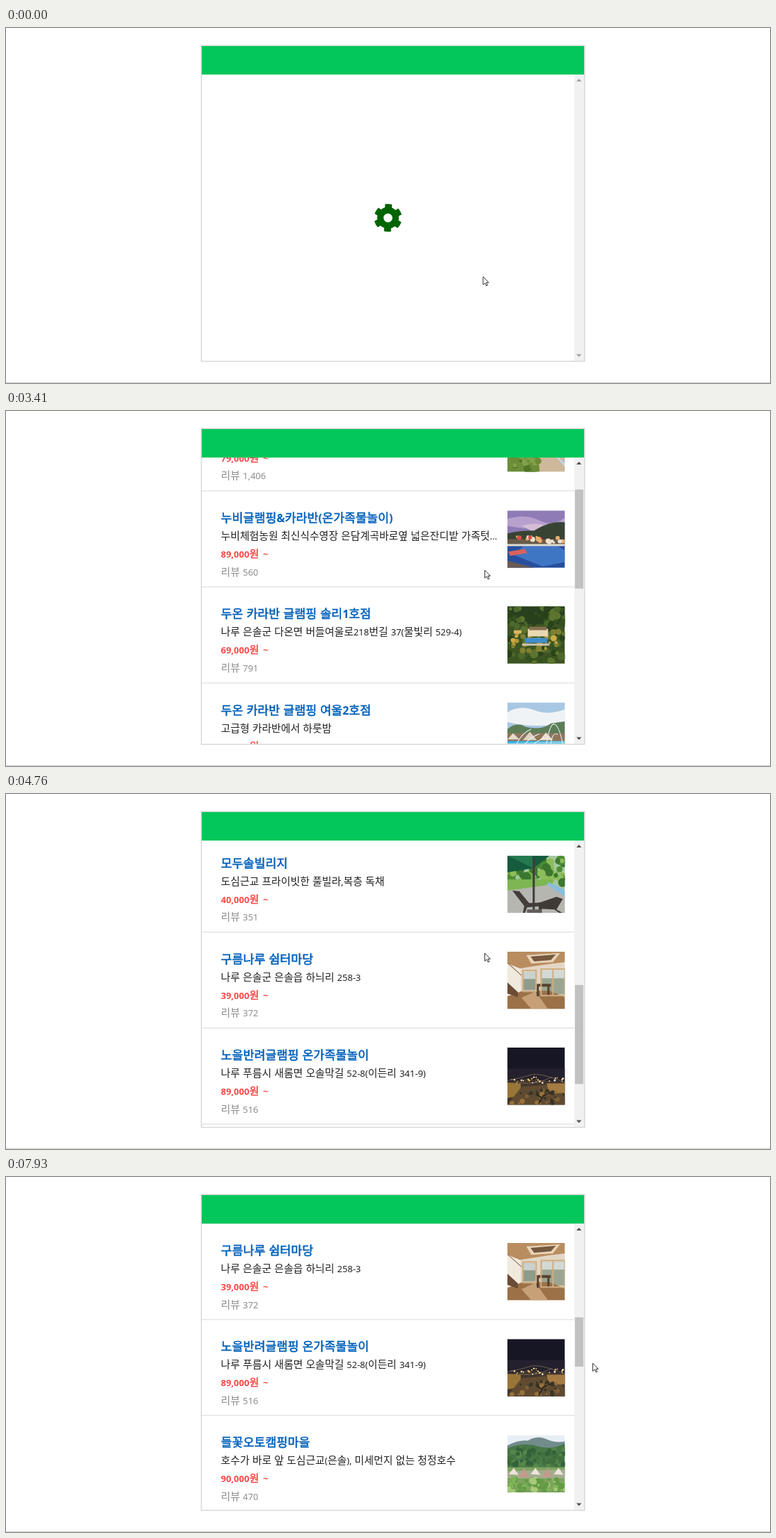
These frames come from a looping animation (1097 by 511 pixels, 8000 ms). An HTML page:

```html
<!DOCTYPE html>
<html lang="ko">
<head>
<meta charset="utf-8">
<style>
  html, body { margin: 0; width: 100%; height: 100%; overflow: hidden; background: #fff; }
  svg { display: block; }
  text { font: 13px "Noto Sans", "Open Sans", sans-serif; fill: #222; word-spacing: .7px; }
  .ko { font-family: "Noto Sans CJK KR", "Noto Sans CJK", sans-serif; font-size: 14.9px; }
  .title { font-size: 16px; font-weight: 700; fill: #0060bb; }
  .title .ko { font-size: 17.4px; font-weight: 400; stroke: #0060bb; stroke-width: .55px; }
  .price { font-weight: 700; fill: #fb4747; word-spacing: 2.5px; }
  .price .ko { font-weight: 400; stroke: #fb4747; stroke-width: .5px; }
  .review { fill: #8c8c8c; }
</style>
</head>
<body>
<svg id="stage" width="1097" height="511" viewBox="0 0 1097 511">
  <clipPath id="view"><path d="M281 67H816V479H281Z"/></clipPath>
  <path fill="#ccc" d="M0 510H1097V511H0Z"/>
  <path fill="#fff" stroke="#d9d9d9" stroke-width="1.6" d="M280.5 25.2H830.8V479.8H280.5Z"/>
  <path fill="#03c75a" d="M281 26H830V67H281Z"/>
  <g clip-path="url(#view)"><g id="list"></g></g>
  <g id="gear" fill="#006400">
    <circle r="15.5"/>
    <path id="tooth" d="M-5 -19.5Q0 -20.5 5 -19.5V19.5Q0 20.5 -5 19.5Z"/>
    <use href="#tooth" transform="rotate(60)"/>
    <use href="#tooth" transform="rotate(120)"/>
    <circle r="6.4" fill="#fff"/>
  </g>
  <path fill="#f1f1f1" d="M816 67H830V479H816Z"/>
  <path id="up" d="M819 77H826.4L822.7 73Z"/>
  <path id="down" d="M819 469.5H826.4L822.7 473.5Z"/>
  <rect id="thumb" x="817" width="12"/>
  <path id="cursor" fill="#fff" stroke="#333" d="M0 0V11.5L2.7 9.1L4.7 13.1L6.4 12.3L4.5 8.4H8Z"/>
</svg>
<script>
const $ = id => document.getElementById(id);
const LOOP = 8000, ROW = 138.2, LIST_AT = 280, MORE_AT = 5580;

let seed = 7;
const rnd = () => (seed = seed * 16807 % 2147483647) / 2147483647;

const shapes = spec => spec.split(';').map(s => {
  const [, fill, d] = s.trim().match(/^(\S+) (.*)$/);
  return `<path fill="${fill}" d="${d}"/>`;
}).join('');

// Scattered spots for foliage, lights and crowds
const spots = (n, x, y, w, h, r, ...colors) => Array.from({ length: n }, () =>
  `<circle cx="${x + rnd() * w}" cy="${y + rnd() * h}" r="${r * (.5 + rnd())}" ` +
  `fill="${colors[rnd() * colors.length | 0]}"/>`).join('');

const line = (d, color, width) => `<path d="${d}" fill="none" stroke="${color}" stroke-width="${width}"/>`;

const photos = [
  // cabins along a path
  shapes('#c3d6e4 M0 0H82V82H0Z; #e2e5e3 M0 22L82 10V45H0Z') +
  spots(22, 24, 22, 34, 18, 4, '#8f9c67', '#6f8549', '#a5ad83') +
  spots(14, 38, 0, 22, 10, 3, '#96a568', '#b6bb86') +
  shapes('#9b5940 M0 12L21 9L29 30L0 33Z; #ddd5c6 M0 33H27V54H0Z; #76594a M6 36H20V55H6Z; #6d8d39 M0 54L43 42L48 82H0Z; #cdb89a M42 43H53L82 75V82H46Z; #754d3c M58 29L70 16L82 34V52L59 42Z; #c9b7a0 M59 38L82 50V70L59 48Z') +
  spots(22, 2, 56, 42, 25, 4, '#517429', '#83a04a', '#6c8a37') +
  line('M64 14L80 60M49 34L82 12M25 4V50', '#4a3d36', 2),
  // pool at dusk
  shapes('#8f7bb5 M0 0H82V42H0Z; #b7a0cd M0 12Q25 4 45 14T82 10V24Q40 30 0 22Z; #d5bdd5 M20 22Q45 15 60 25L40 32Z; #384433 M0 33Q20 28 38 29Q62 14 82 17V46H0Z; #685a49 M0 41H82V52H0Z; #284f9d M0 49H82V82H0Z; #3f76c4 M22 51H72L82 57V74L50 80L10 64Z; #dedbd2 M0 48H82V51H0Z; #da625b M1 59L25 55L28 61L4 65Z; #6a5a54 M0 72L38 82H0Z') +
  spots(20, 0, 37, 82, 9, 2.5, '#dc4c44', '#e7b06c', '#f0dfcf'),
  // lodge in a forest
  shapes('#3d5423 M0 0H82V82H0Z; #28401e M0 0H82V25H0Z') +
  spots(90, 0, 0, 82, 82, 4, '#33501e', '#4c682a', '#5c742f', '#2a421b') +
  spots(32, 4, 36, 74, 28, 3, '#b69738', '#cfaa45', '#7f8131') +
  shapes('#e9d9b2 M29 32H58V43H29Z; #85714f M31 29H56V34H31Z; #3f8ecb M25 45H57V52H25Z; #cdc6ad M21 53H60V56H21Z; #d8b763 M9 34H20V39H9Z'),
  // pool with fountains
  shapes('#a8c7e3 M0 0H82V44H0Z; #f0f3f5 M0 14Q18 3 38 11T82 10V29Q40 38 0 28Z; #5d7d57 M0 38Q14 27 26 35Q49 40 62 30L82 27V52H0Z; #8e765c M0 44H82V57H0Z; #e5ddcf M0 53L8 44L17 53Z; #dfd3c2 M22 54L32 42L42 54Z; #e9e0d3 M46 54L55 43L65 54Z; #35aede M0 55H82V82H0Z; #7acbe8 M0 58L82 55V62L0 68Z') +
  line('M8 82Q11 48 34 38M17 82Q21 53 46 45M27 82Q31 57 52 52M55 65Q60 29 67 31T80 64M61 67Q63 40 72 46', '#e5f4fa', 1),
  // loungers beneath a parasol
  shapes('#a5c8a0 M0 0H82V82H0Z') +
  spots(70, 0, 6, 82, 36, 5, '#4e8e32', '#73ad46', '#3c7730', '#8cbd59') +
  shapes('#7db652 M0 34H64V51H0Z; #86bede M59 38L82 49V61L55 43Z; #b6b6b1 M0 50L58 42L82 59V82H0Z; #155b3e M0 0H60L37 18L0 24Z; #247a50 M0 0H35L37 18Z; #3e3d3b M36 4H39V78H36Z; #423d39 M7 50L17 51L31 68L49 67V72L28 74L25 82H22L24 72Z; #403a37 M44 68L70 59L79 62L70 77L79 82H74L67 77L49 76V82H45Z; #615e5a M28 77H48V82H28Z'),
  // bright wooden room
  shapes('#e3d6c5 M0 0H82V82H0Z; #b98d60 M0 0H82V15L57 18L18 24L0 17Z; #e8d3b5 M27 5L75 2L65 15L34 17Z; #76583f M33 7L69 4L62 12L38 14Z; #f0e9dd M0 17L19 25V63H0Z; #8f9c8b M23 29H40V55H23Z; #c9d2cd M23 29H40V39H23Z; #9ba692 M49 27H82V61H49Z; #d3dad6 M49 27H82V38H49Z; #9c7148 M0 64L22 56H60L82 65V82H0Z; #c7a077 M20 66L40 57L58 82H34Z; #57412f M40 46H62V50H60V64H57V50H45V64H42Z; #6b4c35 M0 44L15 58V65L0 60Z') +
  line('M22 27H41V57H22ZM48 25H82V63H48ZM65 25V63', '#cfae82', 2) +
  line('M0 16L20 34', '#8b6a4a', 1),
  // night garden
  shapes('#171624 M0 0H82V82H0Z; #24202d M0 30H82V50H0Z; #42362d M0 49L25 45L82 49V82H0Z; #997638 M0 50L19 51V69L0 72Z; #604b31 M20 56L70 52L82 73V82H0Z; #a57c43 M56 51H82V65H59Z') +
  line('M0 47Q21 43 33 39T82 50M17 50Q39 54 64 42', '#8e7860', .7) +
  spots(28, 2, 42, 78, 9, 1, '#ffe3a0', '#e9b96b', '#fff0ce') +
  spots(28, 6, 61, 72, 19, 2.5, '#7d6038', '#393526', '#97723a') +
  line('M45 80L51 69L62 64M49 72L42 67', '#31291f', 2),
  // camp below wooded hills
  shapes('#e8eff4 M0 0H82V82H0Z; #718c8b M0 15Q15 7 29 8Q43 0 56 6T82 9V28H0Z; #477746 M0 19Q22 10 43 16T82 12V55H0Z') +
  spots(85, 0, 18, 82, 28, 3, '#416f3d', '#56874b', '#34623a') +
  shapes('#7da35f M0 46H82V82H0Z; #a3ad8e M0 52L82 49V62H0Z') +
  shapes([2, 17, 33, 50, 66].map((x, i) =>
    `${i % 2 ? '#c39a8c' : '#eee4dc'} M${x} ${56 + i % 2 * 4}L${x + 7} 47L${x + 14} ${57 + i % 2 * 4}Z`).join(';')) +
  spots(60, 0, 62, 82, 20, 3, '#7fb457', '#a5cb79', '#659b46')
];

const rows = [
  ['나루 은솔산 포근한 카라반&수영장 글램핑', '나루 은솔산자락에 위치한 최고급글램핑과 럭셔리카라반', '79,000', '1,406'],
  ['누비글램핑&카라반(온가족물놀이)', '누비체험농원 최신식수영장 은담계곡바로옆 넓은잔디밭 가족텃...', '89,000', '560'],
  ['두온 카라반 글램핑 솔리1호점', '나루 은솔군 다온면 버들여울로218번길 37(물빛리 529-4)', '69,000', '791'],
  ['두온 카라반 글램핑 여울2호점', '고급형 카라반에서 하룻밤', '64,000', '614'],
  ['모두솔빌리지', '도심근교 프라이빗한 풀빌라,복층 독채', '40,000', '351'],
  ['구름나루 쉼터마당', '나루 은솔군 은솔읍 하늬리 258-3', '39,000', '372'],
  ['노을반려글램핑 온가족물놀이', '나루 푸름시 새롬면 오솔막길 52-8(이든리 341-9)', '89,000', '516'],
  ['들꽃오토캠핑마을', '호수가 바로 앞 도심근교(은솔), 미세먼지 없는 청정호수', '90,000', '470']
];

const label = (kind, y, str) => `<text class="${kind}" x="308.5" y="${y}">` +
  str.replace(/&/g, '&amp;').replace(/[가-힣]+/g, '<tspan class="ko">$&</tspan>') + '</text>';

$('list').innerHTML = rows.map(([title, info, price, reviews], i) =>
  `<g transform="translate(0 ${67 + i * ROW})">` +
  label('title', 45, title) + label('info', 70, info) +
  label('price', 96, price + '원 ~') + label('review', 121.5, '리뷰 ' + reviews) +
  `<svg x="720" y="28" width="82.5" height="82.5" viewBox="0 0 82 82">${photos[i]}</svg>` +
  '<path fill="#e5e5e5" d="M281 137.4H816V138.9H281Z"/></g>').join('');

// Keys are [time, ...values]
const scrollKeys = [[3090, 0], [3450, 101], [3860, 202.4], [3940, 220], [4760, 558.8],
  [4920, 607], [5250, 607], [5500, 691]];
const cursorKeys = [[0, 685, 358], [250, 690, 352], [860, 818, 190], [940, 821, 179],
  [1080, 845, 110], [1230, 815, 76], [1400, 762, 130], [1550, 790, 212], [1710, 850, 195],
  [1800, 855, 150], [1950, 815, 86], [2120, 765, 140], [2300, 795, 214], [2550, 722, 204],
  [2780, 687.5, 229], [5850, 687.5, 229], [6250, 745, 245], [6500, 790, 284], [6700, 817, 215],
  [6860, 846, 250], [7050, 815, 314], [7250, 770, 260], [7420, 805, 188], [7540, 846, 215],
  [7700, 849, 245], [7800, 820, 255], [7930, 842.5, 268]];

function at(keys, t) {
  const i = keys.findIndex(k => k[0] > t);
  if (i < 0) return keys[keys.length - 1].slice(1);
  if (i === 0) return keys[0].slice(1);
  const a = keys[i - 1], b = keys[i], f = (t - a[0]) / (b[0] - a[0]);
  return a.slice(1).map((v, n) => v + (b[n + 1] - v) * f);
}

const set = (id, attrs) => Object.entries(attrs).forEach(([k, v]) => $(id).setAttribute(k, v));

function draw(t) {
  const loaded = t >= LIST_AT, more = t >= MORE_AT;
  const [scroll] = at(scrollKeys, t), [x, y] = at(cursorKeys, t);
  const top = 82 + scroll * (more ? .1737 : .345), height = more ? 71 : 142.5;
  const hover = x >= 816 && x < 830 && y >= top && y < top + height;
  const arrow = on => ({ fill: on ? '#505050' : '#a3a3a3' });

  set('list', { transform: `translate(0 ${-scroll})`, visibility: loaded ? 'visible' : 'hidden' });
  set('gear', { transform: `translate(548.5 273.3) rotate(${2 + t * .18})`, visibility: loaded ? 'hidden' : 'visible' });
  set('thumb', { y: top, height, fill: hover ? '#a8a8a8' : '#c1c1c1', visibility: loaded ? 'visible' : 'hidden' });
  set('up', arrow(scroll > 0));
  set('down', arrow(loaded));
  set('cursor', { transform: `translate(${x} ${y})` });
}

const start = performance.now();
function tick() {
  draw((performance.now() - start) % LOOP);
  requestAnimationFrame(tick);
}
tick();
</script>
</body>
</html>
```
